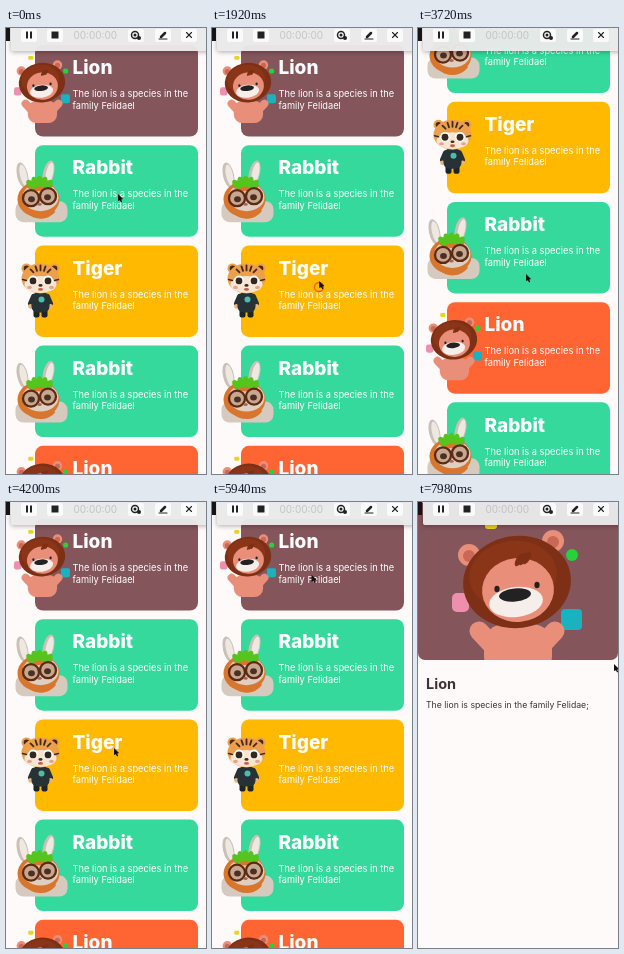
Animation, 200 px wide and 446 px high, one loop 8000 ms. Source, as an HTML page with a canvas:

```html
<!DOCTYPE html>
<html lang="en">
<head>
<meta charset="utf-8">
<title>Animal cards</title>
<style>
html, body { margin: 0; width: 100%; height: 100%; overflow: hidden; background: #fdfaf9; }
canvas { display: block; width: 100vw; height: 100vh; }
</style>
</head>
<body>
<canvas id="stage"></canvas>
<script>
const W = 200, H = 446, LOOP = 8000;
const CARD = { x: 29, y: 17, w: 163, h: 91.5, pitch: 100.2 };
const TRAVEL = 291.5, HERO_H = 158;
const BROWN = '#84565c', GREEN = '#34d99b', YELLOW = '#ffb900', ORANGE = '#ff6432';
const PAGE = '#fdfaf9', INK = '#3a3434', BLACK = '#222';
const SALMON = '#e98f79', MANE = '#7d3015', FUR = '#d6cabf', CARROT = '#d9762d', TIGER = '#eda04c', STRIPE = '#43291f';

const canvas = document.getElementById('stage');
const ctx = canvas.getContext('2d');

const clamp = v => Math.max(0, Math.min(1, v));
const mix = (a, b, p) => a + (b - a) * p;
const ease = (t, start, length) => {
  const p = clamp((t - start) / length);
  return p * p * (3 - 2 * p);
};

function group(draw) {
  ctx.save();
  draw();
  ctx.restore();
}
function shape(color, trace) {
  ctx.fillStyle = color;
  ctx.beginPath();
  trace();
  ctx.fill();
}
const oval = (color, x, y, rx, ry = rx, turn = 0) =>
  shape(color, () => ctx.ellipse(x, y, rx, ry, turn, 0, 7));
const box = (color, x, y, w, h, r = 0) => shape(color, () => ctx.roundRect(x, y, w, h, r));

function line(color, width, x1, y1, x2, y2) {
  ctx.strokeStyle = color;
  ctx.lineWidth = width;
  ctx.lineCap = 'round';
  ctx.beginPath();
  ctx.moveTo(x1, y1);
  ctx.lineTo(x2, y2);
  ctx.stroke();
}
function ring(color, width, x, y, r, from = 0, to = 7) {
  ctx.strokeStyle = color;
  ctx.lineWidth = width;
  ctx.beginPath();
  ctx.arc(x, y, r, from, to);
  ctx.stroke();
}
function text(str, x, y, size, weight, color) {
  ctx.font = `${weight} ${size}px Inter, sans-serif`;
  ctx.fillStyle = color;
  ctx.fillText(str, x, y);
}
const bothSides = draw => [-1, 1].forEach(draw);

// Every animal is drawn around the centre of its head.
function at(x, y, scale, draw) {
  group(() => {
    ctx.translate(x, y);
    ctx.scale(scale, scale);
    draw();
  });
}

function lion() {
  box('#ead51c', -32, -64, 12, 9, 3);
  oval('#25d23b', 55, -29, 6);
  box('#ee8fae', -65, 9, 17, 19, 5);
  box('#19b3c0', 44, 25, 21, 21, 4);
  box(SALMON, -33, 40, 68, 52, 20);
  bothSides(s => {
    line(SALMON, 19, s * 24, 62, s * 38, 47);
    oval(SALMON, s * 42 - 6, -36 - s * 7, 11);
    oval('#c96855', s * 42 - 6, -35 - s * 7, 6);
  });
  oval(MANE, 0, -2, 54, 46, -.12);
  oval('#8b3518', -4, -9, 44, 34, -.12);
  oval(SALMON, 1, 6, 36, 32, -.1);
  for (let i = 0; i < 3; i++) oval(MANE, 2 + i * 4, -24 - i, 3, 7, .5);
  oval('#f5eeea', -1, 18, 27, 15, -.12);
  oval(BLACK, -2, 11, 16, 6.5, -.1);
  bothSides(s => oval(BLACK, s * 20, 3 - s * 2, 2.6, 3.2));
}

function rabbit() {
  bothSides(s => {
    oval('#c9c0b8', s * 13 - 3, -21 - s, 5.5, 13, s * .22);
    oval('#efe8e1', s * 13 - 2, -21 - s, 3.5, 11, s * .22);
  });
  box(FUR, -23, 6, 52, 21, 8);
  oval(CARROT, 0, 4, 21, 18);
  oval('#decfc2', 2, 2, 18, 14);
  ring(CARROT, 3, 2, 4, 18, .7, 2.9);
  oval(CARROT, 1, -10, 13, 6);
  for (let i = -2; i <= 2; i++) oval('#55c51d', 1 + i * 4.5, -14 + i * i * .8, 3.2, 5.5, i * .35);
  bothSides(s => {
    oval('#c9a68e', s * 8.5 + 1, 2 - s, 7.5);
    oval('#4a3024', s * 8 + 1, 3 - s, 3.4, 3);
    ring('#5c2b13', 2.3, s * 8.5 + 1, 2 - s, 8);
  });
  oval('#a8665a', 1, 9, 2.2, 1.5);
}

function tiger() {
  bothSides(s => {
    oval(TIGER, s * 14, -10, 5);
    oval(STRIPE, s * 14, -10, 2.8);
    line('#273237', 5, s * 7, 18, s * 10, 25);
    oval('#e9b57b', s * 10, 28, 2.3);
    box('#1c2528', s * 4 - 3, 28, 6, 11, 2);
  });
  box('#273237', -9, 14, 18, 20, 6);
  oval('#4fbba9', 1, 21, 3);
  oval(TIGER, 0, 0, 19, 15);
  oval('#f7e5d2', 0, 6, 16, 8.5);
  for (let i = -2; i <= 2; i++) line(STRIPE, 1.8, i * 5, -13 + i * i, i * 3.5, -8 + i * i * .5);
  bothSides(s => {
    line(STRIPE, 1.5, s * 18, 1, s * 14, 2);
    oval('#fff', s * 7.5, 2, 4.8);
    oval('#342720', s * 7.5, 2.5, 3.4);
    oval('#e9a18b', s * 11, 9, 2.4, 1.6);
  });
  oval(STRIPE, 0, 7, 2, 1.3);
  oval('#c75e4d', 0, 11, 2.5, 1.4);
}

const LION_SPOT = { x: 36, y: 38.5, scale: .43 };
const littleLion = () => at(LION_SPOT.x, LION_SPOT.y, LION_SPOT.scale, lion);
const KINDS = {
  R: ['Rabbit', GREEN, () => at(32.5, 50, 1, rabbit)],
  T: ['Tiger', YELLOW, () => at(34.5, 33, 1, tiger)],
  L: ['Lion', ORANGE, littleLion],
  B: ['Lion', BROWN, littleLion]
};
const LIST = [...'BRTRLRBRT'];

function card(i, y) {
  const [name, color, draw] = KINDS[LIST[i]];
  // Cards past the first screenfuls swing in as they rise.
  const enter = i > 5 ? clamp((H - y) / 145) : 1;
  const midX = CARD.x + CARD.w / 2, midY = CARD.h / 2;
  group(() => {
    ctx.translate(midX, y + midY);
    ctx.transform(1, 0, .04 * Math.sin(Math.PI * enter), 1, 0, 0);
    ctx.scale(mix(.9, 1, enter), mix(.9, 1, enter));
    ctx.translate(-midX, -midY);
    box(color, CARD.x, 0, CARD.w, CARD.h, 8);
    draw();
    text(name, 66.5, 29.2, 19, 800, '#fff');
    text('The lion is a species in the', 66.5, 52.2, 9.25, 400, '#fff');
    text('family Felidael', 66.5, 63.7, 9.25, 400, '#fff');
  });
}

function detail(p) {
  group(() => {
    ctx.globalAlpha = clamp(p * 1.22);
    box(PAGE, 0, 0, W, H);
    text('Lion', 8, 187, 14.5, 700, INK);
    text('The lion is species in the family Felidae;', 8, 206, 8.7, 400, INK);
  });
  const left = mix(CARD.x, 0, p), top = mix(CARD.y, 0, p);
  const right = mix(CARD.x + CARD.w, W, p), bottom = mix(CARD.y + CARD.h, HERO_H, p);
  group(() => {
    box(BROWN, left, top, right - left, bottom - top, 7);
    ctx.beginPath();
    ctx.rect(0, 0, W, bottom);
    ctx.clip();
    at(mix(LION_SPOT.x, 99, p), mix(CARD.y + LION_SPOT.y, 82, p), mix(LION_SPOT.scale, 1, p), lion);
  });
}

const ICONS = [
  [23, () => bothSides(s => box(BLACK, s * 2 - 1, -3.5, 2, 7))],
  [49, () => box(BLACK, -3.5, -3.5, 7, 7)],
  [130, () => {
    ring(BLACK, 1.5, -1, 0, 3.5);
    oval(BLACK, -1, 0, 1.5);
    oval(BLACK, 3, 3, 2);
  }],
  [157, () => {
    line(BLACK, 2.5, -2, 2, 2, -2);
    line(BLACK, 1, -4, 4, 4, 4);
  }],
  [183, () => bothSides(s => line(BLACK, 1.1, -2.5, -2.5 * s, 2.5, 2.5 * s))]
];

function toolbar() {
  box('#171515', 0, 0, 4, 13);
  group(() => {
    ctx.shadowColor = '#0005';
    ctx.shadowBlur = 5;
    ctx.shadowOffsetY = 1;
    box('#eeeeeef2', 5, -4, W, 27, 2);
  });
  for (const [x, draw] of ICONS) {
    at(x, 7, 1, () => {
      box('#fafafa', -8, -6, 16, 13, 2);
      draw();
    });
  }
  text('00:00:00', 67.5, 10.5, 10, 400, '#c4c4c4');
}

// Each glide: start time, duration and where the pointer ends up.
const GLIDES = [
  [700, 800, 107, 259], [1840, 500, 110, 172], [3350, 370, 108, 246],
  [4250, 650, 126, 82], [5500, 800, 80, 66], [6950, 850, 196, 162]
];

function pointer(t) {
  let x = 112, y = 166;
  for (const [start, length, toX, toY] of GLIDES) {
    const p = ease(t, start, length);
    x = mix(x, toX, p);
    y = mix(y, toY, p);
  }
  if (t > 1780 && t < 1980) ring('#ee5b18', 1.3, 107, 259, 4.5);
  if (t > 6500 && t < 6700) ring('#ee5b18', 1.3, 80, 68, 4.5);
  shape('#111', () => {
    ctx.moveTo(x, y);
    ctx.lineTo(x, y + 7);
    ctx.lineTo(x + 5, y + 5);
  });
  line('#111', 1.3, x + 2, y + 5, x + 3.4, y + 7.6);
}

function frame(now) {
  const t = now % LOOP, dpr = devicePixelRatio || 1;
  const w = Math.round(innerWidth * dpr), h = Math.round(innerHeight * dpr);
  if (canvas.width !== w || canvas.height !== h) {
    canvas.width = w;
    canvas.height = h;
  }
  ctx.setTransform(w / W, 0, 0, h / H, 0, 0);
  box(PAGE, 0, 0, W, H);
  const open = ease(t, 6650, 420);
  const scroll = TRAVEL * (ease(t, 1920, 860) - ease(t, 3350, 735));
  LIST.forEach((_, i) => {
    const y = CARD.y + i * CARD.pitch - scroll;
    if (y > -CARD.pitch && y < H && !(i === 0 && open > 0)) card(i, y);
  });
  if (open > 0) detail(open);
  toolbar();
  pointer(t);
  requestAnimationFrame(frame);
}
requestAnimationFrame(frame);
</script>
</body>
</html>
```
